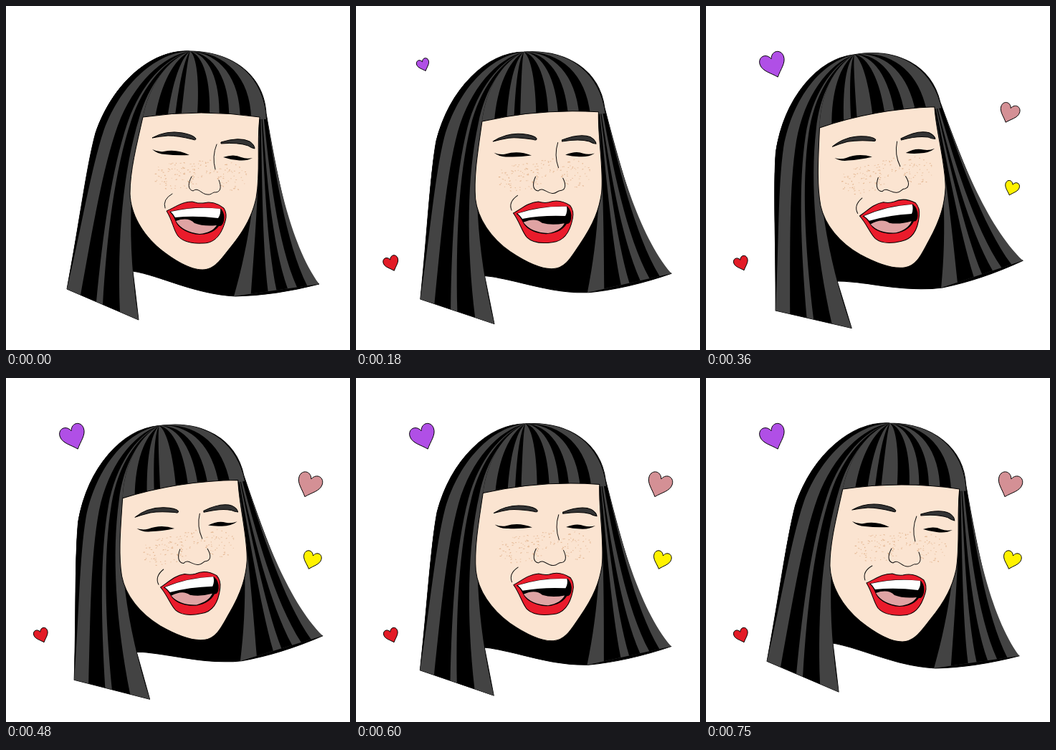
Write an HTML page that moves like this. It is 480x480 px and loops after 0.78 s.

```html
<!DOCTYPE html>
<html lang="en">
<head>
<meta charset="utf-8">
<title>Laughing head</title>
<style>
  html, body { margin: 0; width: 100%; height: 100%; overflow: hidden; background: #fff; }
  svg { display: block; width: 100vw; height: 100vh; }
  .ink { fill: none; stroke: #111; stroke-width: 1; stroke-linecap: round; stroke-linejoin: round; }
  .edge { stroke: #000; stroke-width: 1; stroke-linejoin: round; }
  .hair { fill: #434343; }
</style>
</head>
<body>
<svg viewBox="0 0 480 480">
  <g id="head">
    <path class="edge" d="M257 63C205 60 150 105 125 177C112 225 103 300 85 395L185 438L177 370C215 376 262 402 320 405
      Q375 404 437 388Q430 384 425 376C395 330 376 225 363 150C360 98 318 64 257 63Z"/>
    <g id="locks"></g>
    <path class="edge" fill="#fbe4d1" d="M191 155C182 195 173 230 173 262C174 290 190 318 215 339C235 355 257 368 274 368
      C291 368 300 353 313 337C335 310 344 290 349 268C355 235 350 190 354 155Q272 143 191 155Z"/>
    <g id="freckles" stroke="#e0b18a" stroke-width="1.1" stroke-linecap="round"></g>

    <g class="edge" fill="#333">
      <path d="M204 184Q224 173 246 177Q262 180 265 185Q265 188 260 186Q240 181 226 181Q214 182 204 184Z"/>
      <path d="M300 190Q326 182 340 189Q347 194 347 199Q342 198 338 195Q324 190 300 192Z"/>
    </g>
    <path d="M204 200Q212 204 220 203Q238 199 256 208Q238 209 222 207Q212 207 204 200Z"/>
    <path d="M303 211Q318 206 328 211Q336 214 344 212Q335 217 322 215Q312 214 303 211Z"/>
    <path class="ink" d="M294 193Q287 210 292 228M259 238C254 247 253 256 261 258C268 252 273 263 281 263
      C287 264 288 259 293 260C301 259 300 250 297 243M232 262Q218 270 222 282"/>

    <path class="edge" fill="#ea1b2b" d="M224 286C236 281 245 273 260 273Q268 276 275 275Q290 271 304 282Q309 290 306 300
      C301 318 292 331 275 331C258 332 246 328 240 321C234 313 232 299 224 286Z"/>
    <path d="M228 287Q262 278 300 283Q306 290 304 300Q302 308 297 307Q292 314 283 317Q270 321 258 317
      Q240 311 236 299Q233 291 228 287Z"/>
    <path fill="#fff" d="M230 287Q264 279 299 283Q300 290 296 296Q264 292 236 295Q233 290 230 287Z"/>
    <path fill="#dfa3a3" d="M237 300Q254 294 263 303Q276 308 294 306Q288 316 270 318Q246 315 237 300Z"/>
  </g>
  <g id="hearts"></g>
</svg>
<script>
const LOOP = 780, STEP = 30;
const $ = id => document.getElementById(id);

function add(parent, name, attrs) {
  const el = document.createElementNS('http://www.w3.org/2000/svg', name);
  for (const key in attrs) el.setAttribute(key, attrs[key]);
  parent.append(el);
  return el;
}

// A strand lies between two lines that drift across a lock from root to tip.
const mix = (a, b, f) => a + (b - a) * f;
function line(a, b, [root, tip]) {
  return a.map((p, i) => {
    const f = mix(root, tip, i / (a.length - 1));
    return p.map((v, k) => mix(v, b[i][k], f));
  });
}
const curve = p => 'C' + p.slice(1).join(' ');
function strand({ a, b }, from, to) {
  const p = line(a, b, from), q = line(a, b, to).reverse();
  return `M${p[0]}${curve(p)}L${q[0]}${curve(q)}Z`;
}

const crown = [257, 63];
const fringeLeft = [crown, [225, 75], [200, 110], [191, 155]];
const fringeRight = [crown, [318, 64], [360, 98], [363, 158]];
const even = (from, to) => [[from, from], [to, to]];
const locks = [
  {
    a: [crown, [205, 60], [150, 105], [125, 177], [112, 225], [103, 300], [85, 395]],
    b: [...fringeLeft, [172, 230], [168, 330], [185, 438]],
    dark: [[[0, 0], [.35, 0]], [[.75, .19], [.95, .41]], [[1, .5], [1.1, .74]]]
  },
  {
    a: [[354, 158], [352, 240], [340, 330], [318, 405]],
    b: [[363, 150], [376, 225], [395, 330], [437, 388]],
    dark: [[[0, .2], [.15, .4]], [[.28, .5], [.4, .63]], [[.6, .74], [1, .86]]]
  },
  {
    a: fringeLeft,
    b: fringeRight,
    dark: [even(.1, .2), even(.26, .31), even(.44, .54), even(.62, .7), even(.79, .88)]
  }
];
for (const lock of locks) {
  add($('locks'), 'path', { class: 'hair', d: strand(lock, ...even(0, 1)) });
  for (const [from, to] of lock.dark) add($('locks'), 'path', { d: strand(lock, from, to) });
}

let seed = 11;
const rnd = () => (seed = seed * 16807 % 2147483647) / 2147483647;
function freckles(n, x, y, w, h) {
  for (let i = 0; i < n; i++) {
    const angle = rnd() * 6.283, r = Math.sqrt(rnd());
    const px = x + Math.cos(angle) * r * w, py = y + Math.sin(angle) * r * h;
    add($('freckles'), 'path', {
      d: `M${px} ${py}l${rnd() * 1.6} ${rnd() - .5}`, opacity: .4 + rnd() * .6
    });
  }
}
freckles(80, 238, 237, 34, 20);
freckles(50, 314, 238, 22, 20);
freckles(25, 276, 226, 18, 16);

const HEART = 'M0 .52C-.2 .27-.5 .1-.5-.18C-.5-.5-.12-.57 0-.25C.12-.57 .5-.5 .5-.18C.5 .1 .2 .27 0 .52Z';
const hearts = [
  { x: 49.5, y: 359, size: 20, tilt: -20, start: 90, fill: '#e31b26' },
  { x: 94, y: 82, size: 35, tilt: -20, start: 150, fill: '#b04fe6' },
  { x: 423, y: 149, size: 34, tilt: 20, start: 300, fill: '#d49095' },
  { x: 426.5, y: 254, size: 25, tilt: 18, start: 300, fill: '#fff200' }
];
for (const h of hearts) {
  h.el = add($('hearts'), 'path', {
    d: HEART, fill: h.fill, class: 'edge', 'vector-effect': 'non-scaling-stroke'
  });
}

const POP = [0, .5, .8, 1.06, 1];
const pop = age => age < 0 ? 0 : POP[Math.min(POP.length - 1, Math.floor(age / STEP))];

function draw(now) {
  const t = Math.floor(now % LOOP / STEP) * STEP;
  const turn = -5.2 * (1 - Math.cos(2 * Math.PI * t / 770));
  $('head').setAttribute('transform', `rotate(${turn} 258 343)`);
  for (const h of hearts) {
    const s = pop(t - h.start);
    h.el.setAttribute('visibility', s ? 'visible' : 'hidden');
    h.el.setAttribute('transform', `translate(${h.x} ${h.y}) rotate(${h.tilt}) scale(${h.size * (s || 1)})`);
  }
}

const begin = performance.now();
function tick() {
  draw(performance.now() - begin);
  requestAnimationFrame(tick);
}
tick();
</script>
</body>
</html>
```
